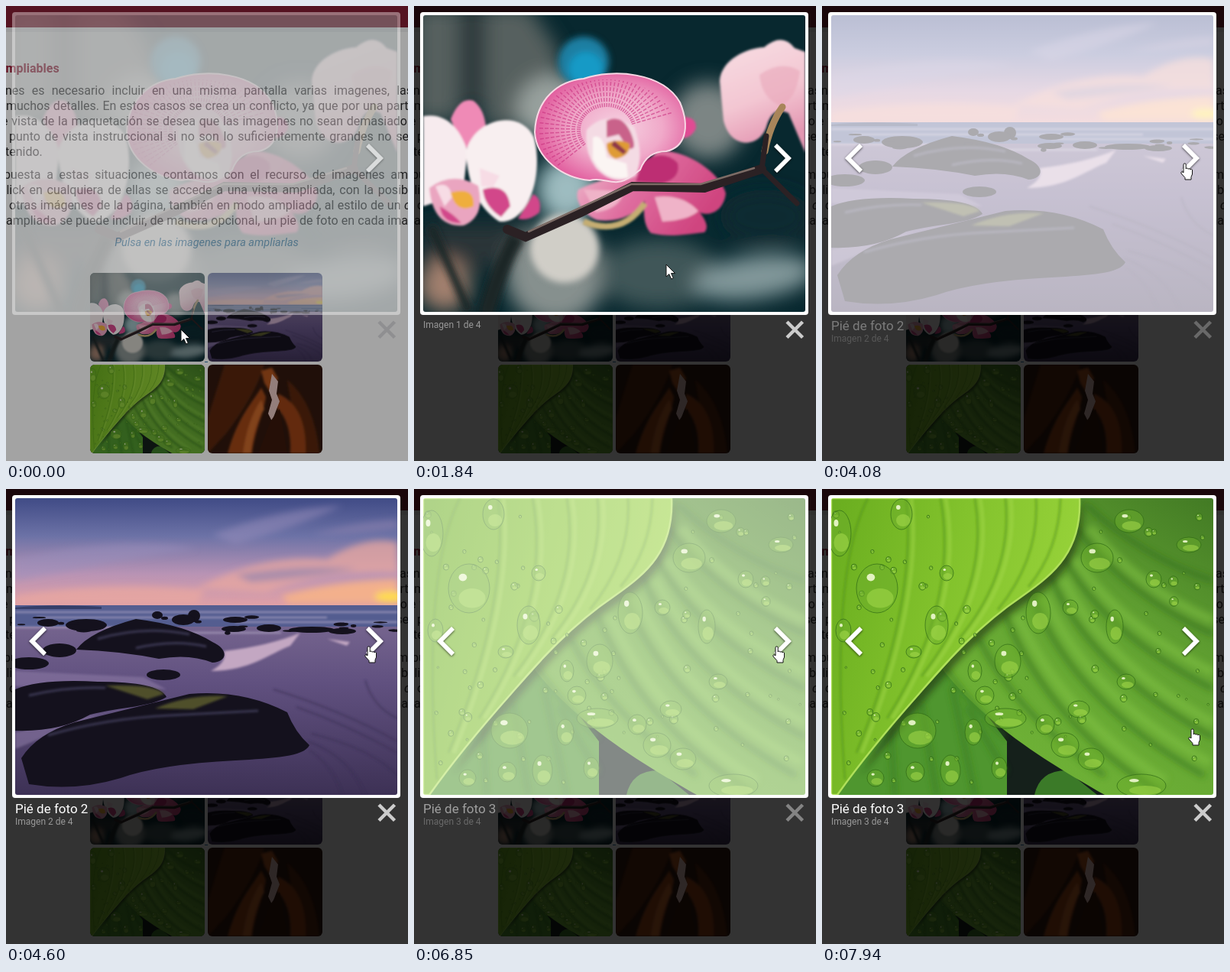
Recreate the animation shown at these times as an HTML page. Size 526 by 595 pixels, loop 8000 ms.

```html
<!DOCTYPE html>
<html lang="es">
<head>
<meta charset="utf-8">
<title>Imágenes ampliables</title>
<style>
html, body { margin: 0; width: 526px; height: 595px; overflow: hidden; background: #fff; }
body { position: relative; font: 16px/20px Roboto, sans-serif; color: #2e2e30; }
header { height: 28px; background: #851e34; border-bottom: 6px solid #f1f1f2; }
p { position: absolute; margin: 0; white-space: nowrap; top: var(--y); left: var(--l); right: var(--r); text-align-last: justify; }
.start { text-align-last: left; }
.title { color: #9c1a36; font-weight: 700; }
.hint { left: 0; width: 525px; text-align-last: center; font-size: 14.5px; font-style: italic; color: #2874a8; }
svg { position: absolute; inset: 0; display: block; }
text { font: 12px Roboto, sans-serif; fill: #999; }
.foot { font-size: 17px; fill: #fff; }

/* one loop is 8 s, so 1% = 80 ms */
.anim { animation: 8s step-end infinite; }
.dim { animation-name: dim; }
.box { animation-name: box; }
.ghost { animation-name: ghost; }
.photo1 { animation-name: photo1; }
.note1 { animation-name: note1; }
.slide2 { animation-name: slide2; }
.slide3 { animation-name: slide3; }
.next { animation-name: next; }
.prev { animation-name: prev; }
.arrow { animation-name: arrow; }
.hand { animation-name: hand; }
@keyframes dim { 0% { opacity: .36 } 1.875% { opacity: .6 } 3.375%, 100% { opacity: .8 } }
@keyframes box { 0% { opacity: .4 } 1.875% { opacity: .75 } 3.375%, 100% { opacity: 1 } }
@keyframes ghost { 0% { opacity: 1 } 1.875%, 100% { opacity: 0 } }
@keyframes photo1 {
  0% { opacity: .38 } 1.875% { opacity: .58 } 3.375% { opacity: .78 }
  5.25% { opacity: .93 } 6.75% { opacity: 1 } 47.75%, 100% { opacity: 0 }
}
@keyframes note1 {
  0% { opacity: 0 } 1.875% { opacity: .2 } 3.375% { opacity: .45 }
  5.25% { opacity: .8 } 6.75% { opacity: 1 } 47.75%, 100% { opacity: 0 }
}
@keyframes slide2 {
  0% { opacity: 0 } 49.25% { opacity: .06 } 51% { opacity: .36 } 52.5% { opacity: .6 }
  54% { opacity: .83 } 55.5% { opacity: .96 } 57.5% { opacity: 1 } 83.625%, 100% { opacity: 0 }
}
@keyframes slide3 {
  0% { opacity: 0 } 83.625% { opacity: .17 } 85.625% { opacity: .53 }
  87.125% { opacity: .82 } 89% { opacity: .97 } 91%, 100% { opacity: 1 }
}
@keyframes next { 0% { opacity: .6 } 1.875% { opacity: .8 } 3.375% { opacity: 1 } 47.75% { opacity: 0 } 49.25%, 100% { opacity: 1 } }
@keyframes prev { 0% { opacity: 0 } 49.25%, 100% { opacity: 1 } }
@keyframes arrow {
  0% { transform: translate(229px, 423px); opacity: 1 }
  18.375% { transform: translate(229px, 423px); animation-timing-function: steps(6, start) }
  27.8% { transform: translate(431px, 253px) }
  28% { transform: translate(431px, 253px); animation-timing-function: steps(2, start) }
  31.25% { transform: translate(445px, 230px) }
  31.375% { transform: translate(445px, 230px); animation-timing-function: steps(5, start) }
  39.2% { transform: translate(468px, 207px); opacity: 1 }
  39.375%, 100% { transform: translate(468px, 207px); opacity: 0 }
}
@keyframes hand {
  0% { transform: translate(469px, 205px); opacity: 0 }
  39.375% { transform: translate(469px, 205px); opacity: 1 }
  91% { transform: translate(469px, 205px); animation-timing-function: steps(4, start) }
  97.35% { transform: translate(471px, 253px) }
  97.625% { transform: translate(475px, 283px) }
  99.25%, 100% { transform: translate(479px, 313px); opacity: 1 }
}
</style>
</head>
<body>
<header></header>
<p class="title start" style="--y:72px;--l:-9px">ampliables</p>
<p style="--y:101px;--l:-1px;--r:-6px">nes es necesario incluir en una misma pantalla varias imagenes, las</p>
<p style="--y:121px;--l:0px;--r:-9px">muchos detalles. En estos casos se crea un conflicto, ya que por una parte</p>
<p style="--y:141px;--l:-6px;--r:1px">e vista de la maquetación se desea que las imagenes no sean demasiado</p>
<p style="--y:161px;--l:4px;--r:-1px">punto de vista instruccional si no son lo suficientemente grandes no se</p>
<p class="start" style="--y:181px;--l:-1px">tenido.</p>
<p style="--y:211px;--l:-3px;--r:0px">puesta a estas situaciones contamos con el recurso de imagenes am</p>
<p style="--y:231px;--l:-8px;--r:0px">click en cualquiera de ellas se accede a una vista ampliada, con la posib</p>
<p style="--y:251px;--l:4px;--r:-3px">otras imágenes de la página, también en modo ampliado, al estilo de un <i>c</i></p>
<p style="--y:271px;--l:0px;--r:0px">ampliada se puede incluir, de manera opcional, un pie de foto en cada ima</p>
<p class="hint" style="--y:300px">Pulsa en las imagenes para ampliarlas</p>

<svg width="526" height="595" viewBox="0 0 526 595">
<defs>
  <filter id="soft" x="-50%" y="-50%" width="200%" height="200%"><feGaussianBlur stdDeviation="13"/></filter>
  <filter id="haze" x="-50%" y="-50%" width="200%" height="200%"><feGaussianBlur stdDeviation="4"/></filter>
  <filter id="smooth" x="-20%" y="-20%" width="140%" height="140%"><feGaussianBlur stdDeviation="1.5"/></filter>
  <filter id="shade" x="-50%" y="-50%" width="200%" height="200%"><feDropShadow dx="0" dy="1" stdDeviation="1.6" flood-opacity=".7"/></filter>
  <radialGradient id="petal" cx=".55" cy=".5" r=".6">
    <stop offset="0" stop-color="#f6d3e2"/><stop offset=".5" stop-color="#f0a9c9"/><stop offset="1" stop-color="#de4c94"/>
  </radialGradient>
  <linearGradient id="lower" x1="0" x2="1" y2=".4">
    <stop offset="0" stop-color="#efc0cf"/><stop offset=".5" stop-color="#df6d9f"/><stop offset="1" stop-color="#cf447f"/>
  </linearGradient>
  <linearGradient id="blush" y1="0" x2=".3" y2="1">
    <stop offset="0" stop-color="#f7dfe4"/><stop offset=".6" stop-color="#f3c6d2"/><stop offset="1" stop-color="#e397b2"/>
  </linearGradient>
  <linearGradient id="sky" x2="0" y2="1">
    <stop offset="0" stop-color="#404b86"/><stop offset=".35" stop-color="#6c72a6"/>
    <stop offset=".7" stop-color="#b893b4"/><stop offset="1" stop-color="#e0a0a6"/>
  </linearGradient>
  <linearGradient id="sand" x2="0" y2="1">
    <stop offset="0" stop-color="#7c6b93"/><stop offset=".4" stop-color="#615180"/><stop offset="1" stop-color="#3d3155"/>
  </linearGradient>
  <linearGradient id="bright" x2="1" y2=".3">
    <stop offset="0" stop-color="#69ad1f"/><stop offset=".5" stop-color="#82c22c"/><stop offset="1" stop-color="#98d33a"/>
  </linearGradient>
  <linearGradient id="deep" x1="1" y1="0" x2=".4" y2="1">
    <stop offset="0" stop-color="#427a24"/><stop offset=".45" stop-color="#62a232"/><stop offset="1" stop-color="#6fb236"/>
  </linearGradient>
  <clipPath id="frame"><rect x="12" y="12" width="500" height="388" rx="3"/></clipPath>
  <clipPath id="thumb"><rect width="150" height="116" rx="6"/></clipPath>

  <symbol id="orchid" viewBox="12 12 500 388" preserveAspectRatio="none">
    <path fill="#08282f" d="M12 12H512V400H12Z"/>
    <g filter="url(#soft)">
      <path fill="#56605f" d="M0 0H60V150H0ZM92 0H150L190 60V160H92Z"/>
      <path fill="#2a3637" d="M62 0H90V130H62ZM12 285H150L130 340H12Z"/>
      <ellipse cx="185" cy="135" rx="50" ry="45" fill="#98a19e"/>
      <ellipse cx="200" cy="240" rx="40" ry="42" fill="#9dbcc0"/>
      <ellipse cx="385" cy="150" rx="48" ry="50" fill="#7b8584"/>
      <ellipse cx="185" cy="350" rx="65" ry="65" fill="#86908e"/>
      <ellipse cx="40" cy="365" rx="34" ry="34" fill="#a2806e"/>
      <ellipse cx="320" cy="350" rx="80" ry="45" fill="#415659"/>
      <ellipse cx="445" cy="355" rx="80" ry="28" fill="#81979a" transform="rotate(-8 445 355)"/>
      <ellipse cx="460" cy="275" rx="60" ry="35" fill="#0a2a30"/>
    </g>
    <g filter="url(#haze)">
      <circle cx="222" cy="73" r="33" fill="#1a7fa3"/>
      <circle cx="225" cy="82" r="22" fill="#169ac6"/>
      <circle cx="197" cy="317" r="45" fill="#d0cec7"/>
      <path fill="none" stroke="#1c2526" stroke-width="11" d="M22 288Q42 330 72 400"/>
      <path fill="none" stroke="#1f2728" stroke-width="22" d="M135 300Q112 340 94 405"/>
    </g>
    <g filter="url(#smooth)">
      <path fill="url(#lower)" d="M215 240C245 225 300 215 318 190C350 185 400 215 408 245C405 270 385 275 374 270Q388 288 380 296C350 300 330 302 310 297Q298 285 302 255Q280 285 240 280C225 275 208 255 215 240Z"/>
      <path fill="#bd2f73" d="M298 205Q325 185 345 205Q350 225 325 232L290 230Z"/>
      <path fill="#efb3c8" d="M315 250Q350 245 372 268Q360 280 325 282ZM222 240L275 242Q270 265 238 270Z"/>
      <path fill="none" stroke="#c5ad72" stroke-width="8" d="M222 282Q272 302 302 258"/>
      <path fill="url(#blush)" d="M400 98C402 70 435 55 458 54Q482 34 498 55L512 60V192L490 140Q470 130 462 155C455 185 415 190 405 150Z"/>
      <path fill="#e9a9bb" opacity=".6" d="M452 90Q480 70 505 85Q500 125 478 130Q455 120 452 90Z"/>
    </g>
    <g fill="none" stroke="#2b2124" stroke-linecap="round">
      <path stroke="#a8855a" stroke-width="9" d="M482 132Q466 155 459 190"/>
      <path stroke-width="12" d="M122 292L146 302L218 270L286 236L380 238L455 213"/>
      <path stroke-width="7" d="M455 213L461 170M457 215L501 258"/>
      <path stroke="#7c6c66" stroke-width="2.500" d="M150 295L284 233L375 233L445 212"/>
    </g>
    <g filter="url(#smooth)">
      <path fill="#ef8ab6" d="M48 148Q60 118 78 124Q92 135 94 158L65 190Z"/>
      <path fill="#f7ebee" d="M12 144C45 138 62 165 70 190L64 245L12 262Z"/>
      <path fill="#f8eff0" d="M68 190C80 145 140 135 157 172C170 220 150 285 112 282C85 265 70 235 68 190Z"/>
      <path fill="#eaa5c0" d="M20 238Q50 215 84 235Q94 275 65 287Q25 290 20 238Z"/>
      <path fill="#d2478a" d="M90 240Q122 230 126 262L114 276Q92 262 90 240ZM156 246Q168 252 164 270Q150 282 136 278ZM34 262Q52 272 62 284Q36 284 34 262Z"/>
      <path fill="#f7dce5" d="M28 236Q46 228 50 250L40 262ZM86 212L112 222L104 236H88Z"/>
      <path fill="#efae3c" d="M48 244Q80 235 78 262Q55 272 48 244Z"/>
      <path fill="#e04c93" d="M352 145Q370 145 369 160Q362 175 348 172Z"/>
    </g>
    <path fill="url(#petal)" stroke="#f8d9e5" stroke-width="2" d="M158 165C160 120 190 98 222 95C260 82 325 86 348 126C362 160 354 185 330 190Q305 190 296 214L285 222C262 240 250 222 230 228C195 225 160 200 158 165Z"/>
    <g id="veins" stroke="#c9307f" stroke-width="1.500" stroke-dasharray="5 2" opacity=".6"/>
    <g filter="url(#smooth)">
      <path fill="#f4dbe4" d="M226 162Q250 135 288 158Q302 195 290 222Q262 238 238 212Q222 190 226 162Z"/>
      <path fill="#c9628a" d="M252 150Q275 140 286 172Q292 190 280 186L268 168L252 172Z"/>
      <path fill="#fbf5f3" d="M234 172Q248 165 252 198L278 206L280 224Q250 230 234 200Z"/>
      <path fill="#df9b36" d="M252 180Q266 172 282 180Q284 196 264 200Q252 196 252 180Z"/>
      <path fill="#8e3548" d="M262 176L278 190L274 194L258 182Z"/>
    </g>
  </symbol>

  <symbol id="beach" viewBox="12 12 500 388" preserveAspectRatio="none">
    <path fill="url(#sky)" d="M12 12H512V153H12Z"/>
    <g filter="url(#haze)">
      <path fill="#e9a7a0" opacity=".75" d="M250 130Q330 85 420 92Q470 60 512 70V110Q420 105 340 135ZM12 140Q130 120 260 132L250 150H12Z"/>
      <path fill="#f3b08c" d="M360 140Q430 120 512 118V150H370Z"/>
      <path fill="#9a90bb" opacity=".5" d="M12 92Q150 60 250 78Q160 92 12 120ZM270 60Q360 25 440 22Q380 50 300 72Z"/>
      <path fill="#8a80ae" opacity=".6" d="M300 112Q380 98 460 104Q400 116 320 122ZM400 60Q460 42 512 40V52Q450 60 400 60Z"/>
      <ellipse cx="503" cy="141" rx="20" ry="7" fill="#ffdc4d"/>
    </g>
    <path fill="url(#sand)" d="M12 152H512V400H12Z"/>
    <path fill="#545d90" d="M12 152H512V180H12Z"/>
    <path fill="#353e69" d="M12 155Q60 150 125 154V157H12Z"/>
    <path fill="none" stroke="#b9aecb" stroke-width="2" d="M12 161H512M40 168H420M300 174H512M12 181H200M180 188H360" opacity=".7" filter="url(#smooth)"/>
    <g filter="url(#smooth)">
      <path fill="#c3a7c2" d="M285 212Q345 205 385 188L372 205C345 215 320 238 268 238Q290 226 285 212ZM420 196L450 200L446 205Z"/>
      <path fill="#8b79a3" opacity=".6" d="M12 238L180 246L210 262L12 258ZM90 300L240 270L120 296L12 340V318Z"/>
      <path fill="none" stroke="#3a2d52" stroke-width="2" opacity=".6" d="M395 330Q450 350 470 400M398 342Q430 365 440 400M400 320Q480 340 512 375M350 262Q440 290 512 330M380 285Q450 310 512 345M470 250Q480 285 512 300"/>
    </g>
    <g fill="#14111d">
      <path d="M12 262Q45 248 120 252Q200 252 210 272C190 285 150 285 110 295Q70 318 12 316Z"/>
      <path d="M20 352Q40 320 90 305L240 268Q310 262 368 292Q378 318 397 335C390 350 350 352 300 355Q200 360 150 378Q90 396 30 386Z"/>
      <path d="M92 210Q110 186 170 170Q235 178 270 200C292 210 290 226 270 227Q240 215 200 222Q150 212 92 210Z"/>
      <g id="stones"/>
    </g>
    <g filter="url(#smooth)">
      <path fill="#4f5029" d="M130 257Q195 255 207 268L185 275ZM195 287Q240 268 290 271L245 288Z"/>
      <path fill="none" stroke="#4b4667" stroke-width="3" opacity=".7" d="M55 322Q130 300 215 296L330 290M120 196Q180 178 240 190M30 270Q80 258 130 260M170 208Q220 196 262 206"/>
    </g>
  </symbol>

  <symbol id="leaf" viewBox="12 12 500 388" preserveAspectRatio="none">
    <path fill="#15201b" d="M12 12H512V400H12Z"/>
    <path fill="#4f962f" d="M12 400L100 270L165 220L215 295L242 330V400Z"/>
    <path fill="#3b7a28" d="M278 400Q285 368 320 368L360 400Z"/>
    <path fill="url(#deep)" d="M330 12H512V400H370C320 372 260 335 220 300Q180 265 158 236L240 140Z"/>
    <g fill="none" filter="url(#haze)">
      <path stroke="#82c343" stroke-width="12" opacity=".55" d="M330 90Q390 180 512 240M316 117Q366 225 512 306M292 140Q346 270 508 358M256 165Q316 298 450 382M350 50Q412 130 512 172"/>
      <path stroke="#2f6a1c" stroke-width="6" opacity=".65" d="M318 90Q370 190 512 262M300 115Q350 235 512 325M275 140Q330 280 500 375M240 165Q300 310 440 395M205 195Q250 290 370 375M332 50Q400 140 512 190M345 20Q420 90 512 120"/>
      <path stroke="#35741f" stroke-width="5" opacity=".7" d="M170 258L200 400M130 280L150 400M90 310L95 400M190 285L240 370M160 232Q190 275 240 325"/>
    </g>
    <path fill="#14230f" opacity=".55" filter="url(#haze)" d="M340 12C346 85 312 120 268 148C205 190 165 240 130 280L50 375L120 260L330 60Z"/>
    <path fill="url(#bright)" stroke="#b0e05a" stroke-width="2.500" d="M12 12H337C340 80 305 110 262 140C200 182 160 230 125 270C85 315 45 365 20 400H12Z"/>
    <g fill="none" filter="url(#smooth)">
      <path stroke="#4f9018" stroke-width="3" opacity=".5" d="M60 12Q10 110 30 380M110 12Q125 150 45 345M155 12Q180 150 85 300M200 12Q220 130 130 245M240 12Q250 110 180 195M280 12Q285 90 230 158M312 12Q310 80 270 128"/>
      <path stroke="#a9dc52" stroke-width="5" opacity=".4" d="M117 12Q132 150 52 345M162 12Q187 150 92 300M207 12Q227 130 137 245M247 12Q257 110 187 195"/>
    </g>
    <g id="drops"/>
  </symbol>

  <symbol id="canyon" viewBox="0 0 150 116" preserveAspectRatio="none">
    <path fill="#32180e" d="M0 0H150V116H0Z"/>
    <g filter="url(#smooth)">
      <path fill="#5a260f" d="M22 0H74Q62 40 24 90L0 116V70ZM104 20Q140 50 146 116H120Z"/>
      <path fill="#a04616" d="M70 30C60 48 40 66 26 116H58C62 84 74 62 76 42Z"/>
      <path fill="#c9682a" d="M70 46Q52 72 46 116H56Q60 80 74 58Z"/>
      <path fill="#9a4215" d="M92 38Q130 55 128 116H108Q110 75 90 56Z"/>
      <path fill="#b0521c" d="M70 8L84 4L92 18L82 36L74 24Z"/>
    </g>
    <path fill="#e6c5c0" d="M84 12L92 22L90 38L94 48L84 74L79 64L84 46L80 34Z"/>
    <path fill="#39180b" d="M82 74L94 58L104 116H66Z"/>
  </symbol>

  <path id="close" d="M488 413L508.500 433.500M508.500 413L488 433.500" fill="none" stroke-width="4.500"/>
  <path id="chevron" d="M-9 -17L8 0L-9 17" fill="none" stroke="#fff" stroke-width="5.500" filter="url(#shade)"/>
</defs>

<g>
  <path stroke="#2874a8" d="M260 465.500H264"/>
  <g transform="translate(110 349)" clip-path="url(#thumb)"><use href="#orchid" width="150" height="116"/></g>
  <g transform="translate(264 349)" clip-path="url(#thumb)"><use href="#beach" width="150" height="116"/></g>
  <g transform="translate(110 469)" clip-path="url(#thumb)"><use href="#leaf" width="150" height="116"/></g>
  <g transform="translate(264 469)" clip-path="url(#thumb)"><use href="#canyon" width="150" height="116"/></g>
</g>
<rect class="anim dim" width="526" height="595"/>

<g class="anim box">
  <rect x="8" y="8" width="508" height="396" rx="4" fill="#fff"/>
  <g clip-path="url(#frame)">
    <use class="anim photo1" href="#orchid" x="12" y="12" width="500" height="388"/>
    <use class="anim slide2" href="#beach" x="12" y="12" width="500" height="388"/>
    <use class="anim slide3" href="#leaf" x="12" y="12" width="500" height="388"/>
  </g>
</g>
<g class="anim next"><use href="#chevron" transform="translate(482 199)"/></g>
<g class="anim prev"><use href="#chevron" transform="translate(42 199) scale(-1 1)"/></g>

<use class="anim ghost" href="#close" stroke="#8f8f91"/>
<g class="anim note1"><text x="12" y="421">Imagen 1 de 4</text><use href="#close" stroke="#ccc"/></g>
<g class="anim slide2">
  <text class="foot" x="12" y="424">Pié de foto 2</text><text x="12" y="439">Imagen 2 de 4</text><use href="#close" stroke="#ccc"/>
</g>
<g class="anim slide3">
  <text class="foot" x="12" y="424">Pié de foto 3</text><text x="12" y="439">Imagen 3 de 4</text><use href="#close" stroke="#ccc"/>
</g>

<g fill="#fff" stroke="#111" stroke-linejoin="round">
  <path class="anim arrow" d="M0 0V16L3.800 12.600L6.600 19L9.300 17.800L6.500 11.600H11.600Z"/>
  <path class="anim hand" d="M4 13V2.500a1.600 1.600 0 0 1 3.200 0V8a1.500 1.500 0 0 1 2.900.4a1.500 1.500 0 0 1 2.800.7a1.400 1.400 0 0 1 2.600.9V15L14 18.500V22H6V19.500L1 14C0 12 2 11 4 13Z"/>
</g>
</svg>

<script>
const fill = (id, parts) => { document.getElementById(id).innerHTML = parts.join(''); };
const ellipse = (x, y, rx, ry, more = '') => `<ellipse cx="${x}" cy="${y}" rx="${rx}" ry="${ry}" ${more}/>`;

let seed = 11;
const rnd = (a, b) => {
  seed = (seed * 16807) % 2147483647;
  return a + (b - a) * seed / 2147483647;
};

// dashed veins fan out from the middle of the flower
fill('veins', Array.from({ length: 44 }, (_, i) => {
  const a = Math.PI * (.8 + i * .026), c = Math.cos(a), s = Math.sin(a);
  const r = 1 / Math.hypot(c / 90, s / 66);
  return `<path d="M${252 + c * 34} ${162 + s * 30}L${252 + c * r} ${162 + s * r}"/>`;
}));

fill('stones', [
  [198, 165, 7, 5], [246, 166, 8, 8], [232, 171, 15, 7], [105, 178, 27, 8], [55, 175, 14, 5], [70, 211, 22, 9],
  [30, 228, 26, 8], [206, 243, 22, 7], [300, 171, 16, 4], [298, 183, 16, 4], [344, 182, 16, 5], [400, 184, 30, 4], [440, 186, 18, 4]
].map(s => ellipse(...s)).concat(Array.from({ length: 24 }, () =>
  ellipse(rnd(20, 510), rnd(167, 190), rnd(3, 10), rnd(1, 2.5)))));

const drop = (x, y, rx, ry) =>
  ellipse(x, y, rx, ry, 'fill="#6cae2c" fill-opacity=".5" stroke="#2f6a16" stroke-opacity=".7"') +
  ellipse(x + rx * .15, y + ry * .4, rx * .65, ry * .4, 'fill="#a5da4c" opacity=".55"') +
  ellipse(x - rx * .3, y - ry * .45, rx * .2, ry * .15, 'fill="#effad2" opacity=".9"');

const big = [
  [72, 130, 27, 32], [23, 58, 15, 30], [104, 33, 14, 20], [163, 110, 9, 10], [283, 162, 16, 27], [360, 90, 21, 19],
  [402, 42, 19, 15], [480, 73, 16, 10], [434, 118, 10, 11], [383, 180, 11, 22], [150, 178, 15, 25], [28, 185, 10, 15],
  [120, 213, 10, 8], [243, 225, 17, 22], [125, 316, 24, 23], [168, 368, 13, 20], [122, 370, 12, 13], [70, 378, 11, 11],
  [198, 318, 11, 17], [232, 365, 10, 14], [213, 270, 12, 12], [240, 300, 27, 13], [318, 335, 18, 16], [352, 353, 17, 14],
  [398, 252, 12, 10], [336, 288, 14, 11], [292, 308, 12, 13], [418, 388, 32, 15], [200, 238, 9, 14], [325, 155, 10, 10]
];
const small = Array.from({ length: 110 }, () => {
  const r = rnd(1.2, 2.8) + rnd(0, 1) ** 4 * 4;
  return [rnd(15, 510), rnd(30, 395), r, r * 1.1];
}).filter(([x, y]) => (y > 140 || x < 150 || x > 340) && !(y > 320 && x > 238 && x < 300));
fill('drops', [...small, ...big].map(d => drop(...d)));
</script>
</body>
</html>
```
